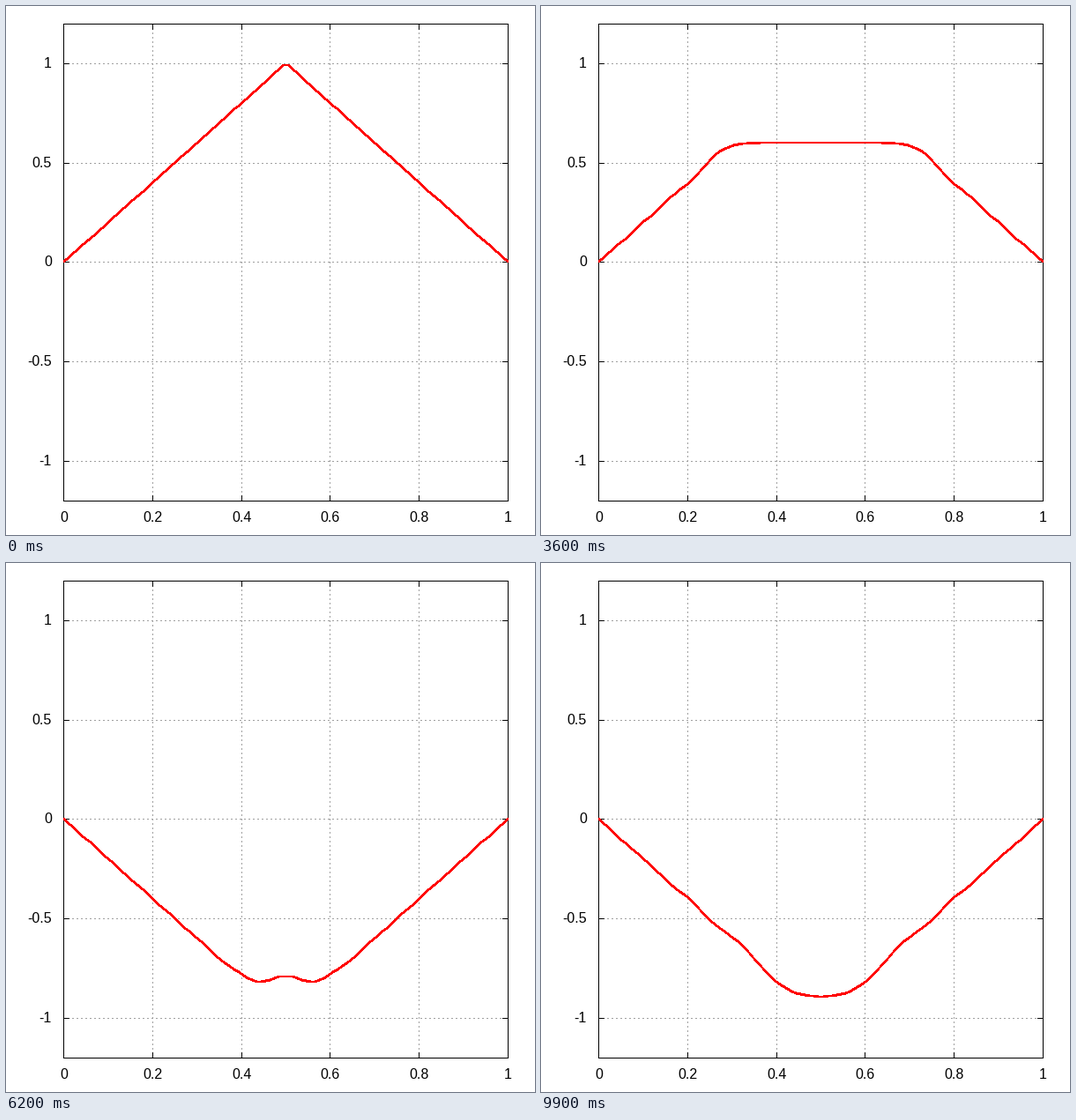
Write a matplotlib script that moves like this. It is 600x600 px and loops after 10 s.

```python
import numpy as np
import matplotlib.pyplot as plt
from matplotlib.animation import FuncAnimation

SIZE, DPI = 600, 100
PX = 72 / DPI                                   # one pixel in points
LEFT, RIGHT, TOP, BOTTOM = 65, 569, 20, 561
FRAMES, INTERVAL, STEP = 100, 100, 0.05
CELLS = 99                                      # string segments


def to_px(x):
    return np.floor(LEFT + (RIGHT - LEFT) * x + 0.5)


def to_py(y):
    return BOTTOM - np.floor((BOTTOM - TOP) * (y + 1.2) / 2.4 + 0.5)


fig = plt.figure(figsize=(SIZE / DPI, SIZE / DPI), dpi=DPI, facecolor="white")
ax = fig.add_axes([0, 0, 1, 1])
ax.set_xlim(0, SIZE)
ax.set_ylim(SIZE, 0)
ax.axis("off")


def line(x0, y0, x1, y1, **style):
    ax.plot([x0 + 0.5, x1 + 0.5], [y0 + 0.5, y1 + 0.5], lw=PX, aa=False,
            snap=False, solid_capstyle="projecting", **style)


def grid(x0, y0, x1, y1):
    ax.plot([x0, x1], [y0, y1], color="#a0a0a0", lw=PX, aa=False, snap=False,
            ls=(0, (2, 3)), dash_capstyle="butt", zorder=1)


def label(x, y, text, ha):
    ax.text(x, y, text, ha=ha, va="baseline", family="Liberation Sans",
            size=16 * PX, color="black")


# Grid, ticks and labels
for v in (0, 0.2, 0.4, 0.6, 0.8, 1):
    x = to_px(v)
    if 0 < v < 1:
        grid(x + 0.5, BOTTOM + 1, x + 0.5, TOP)
    line(x, BOTTOM, x, BOTTOM - 6, color="black")
    line(x, TOP, x, TOP + 6, color="black")
    label(x + 0.5, 585, f"{v:g}", "center")

for v in (-1, -0.5, 0, 0.5, 1):
    y = to_py(v)
    grid(LEFT, y + 0.5, RIGHT + 1, y + 0.5)
    line(LEFT, y, LEFT + 6, y, color="black")
    line(RIGHT, y, RIGHT - 6, y, color="black")
    label(52, y + 5, f"{v:g}", "right")

for x in (LEFT, RIGHT):
    line(x, TOP, x, BOTTOM, color="black")
for y in (TOP, BOTTOM):
    line(LEFT, y, RIGHT, y, color="black")

# Plucked string: normal modes of the discretised wave equation
nodes = np.arange(CELLS + 1) / CELLS
k = np.arange(1, CELLS)
modes = np.sin(np.pi * np.outer(k, k) / CELLS)
pluck = 1 - np.abs(2 * nodes[1:-1] - 1)
amps = 2 / CELLS * modes @ pluck
omega = 2 * CELLS * np.sin(np.pi * k / (2 * CELLS))

xs = to_px(nodes) + 0.5
xs[0] -= 0.5
xs[-1] += 0.5
string = plt.Polygon(np.zeros((3, 2)), closed=True, fc="#ff0000", ec="none",
                     lw=0, aa=False, snap=False, zorder=5)
ax.add_patch(string)


def update(i):
    y = np.pad(modes @ (amps * np.cos(omega * STEP * i)), 1)
    ys = to_py(y)
    upper = np.column_stack([xs, ys - 1])
    lower = np.column_stack([xs, ys + 1])
    string.set_xy(np.vstack([upper, lower[::-1]]))
    return (string,)


anim = FuncAnimation(fig, update, frames=FRAMES, interval=INTERVAL,
                     init_func=lambda: update(0), repeat=True, repeat_delay=0)
plt.show()
```
